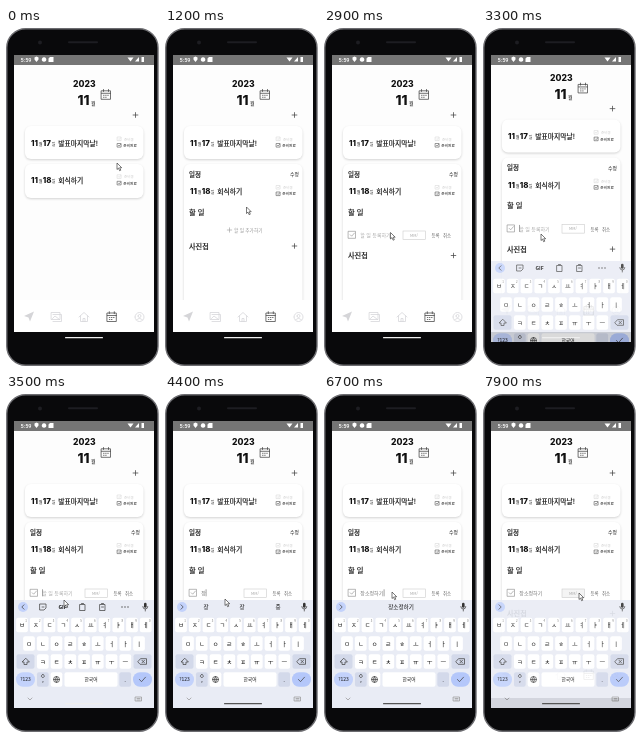
Animation of 153x338 px, one loop 8 s. Source, as an HTML page:

```html
<!DOCTYPE html>
<html lang="ko">
<head>
<meta charset="utf-8">
<style>
  html, body { margin: 0; width: 100%; height: 100%; overflow: hidden; background: #fff; }
  svg { display: block; width: 153px; height: 338px; }
  text { font-family: "Noto Sans CJK KR", "Noto Sans CJK", sans-serif; font-weight: 500; fill: #111; }
  .num { font-family: Inter, sans-serif; font-weight: 800; }
  .title { stroke: #111; stroke-width: .18; }
  .line { fill: none; stroke: #444; stroke-width: .75; stroke-linecap: round; stroke-linejoin: round; }
  .pale { stroke: #d5d5d8; }
  .card { fill: #fff; filter: drop-shadow(0 1.8px 1.2px rgba(0, 0, 0, .17)); }
</style>
</head>
<body>
<svg id="stage" viewBox="0 0 153 338"></svg>
<script>
const stage = document.getElementById('stage');
const text = (x, y, size, label, attrs = '') =>
  `<text x="${x}" y="${y}" font-size="${size}" ${attrs}>${label}</text>`;
const mid = (x, y, size, label, attrs = '') => text(x, y, size, label, 'text-anchor="middle" ' + attrs);
const title = (x, y, size, label) => text(x, y, size, label, 'class="title"');
const rect = (x, y, w, h, attrs = '') => `<rect x="${x}" y="${y}" width="${w}" height="${h}" ${attrs}/>`;
const line = (d, attrs = '', cls = '') => `<path class="line ${cls}" d="${d}" ${attrs}/>`;
const plus = (x, y, r, attrs = '') => line(`M${x - r} ${y}h${2 * r}M${x} ${y - r}v${2 * r}`, attrs);
const group = (id, body, attrs = '') => `<g id="${id}" ${attrs}>${body}</g>`;
const gray = 'style="fill:#999"';

const calendar = (x, y) =>
  line(`M${x - 4.5} ${y - 4}h9v8.5h-9zM${x - 4.5} ${y - 1.5}h9M${x - 2.5} ${y - 5.3}v2M${x + 2.5} ${y - 5.3}v2`) +
  line(`M${x - 2.5} ${y + .5}h5M${x - 2.5} ${y + 2.5}h3`, 'stroke-dasharray=".6 1.5"');

const check = (x, y, s, color) =>
  line(`M${x} ${y}h${s}v${s}h${-s}zM${x + s * .25} ${y + s * .5}l${s * .2} ${s * .2}l${s * .4} ${-s * .45}`,
    `style="stroke:${color};stroke-width:.6"`);

// One schedule entry, placed by its text baseline.
const entry = (y, day, name) =>
  text(25, y, 7.9, '11', 'class="num"') + text(32.8, y, 4, '월') +
  text(36.8, y, 7.9, day, 'class="num"') + text(45.8, y, 4, '일') +
  title(52.3, y, 6.8, name) +
  check(111.5, y - 8.5, 3.6, '#d8d8d8') + text(118, y - 5, 3.6, '준비중', 'style="fill:#d0d0d0"') +
  check(111.5, y - 2, 3.6, '#555') + text(117.3, y + 1.5, 3.7, '준비완료');

const header =
  mid(78.3, 59.3, 8.6, '2023', 'class="num"') +
  text(71.5, 77.3, 13.6, '11', 'class="num"') + text(85, 77, 5, '월') +
  calendar(100, 66.8) + plus(129.5, 87, 2.4);

const form =
  check(24.5, 203.3, 7, '#888') +
  text(36.3, 209, 5, '', 'id="typed"') +
  rect(36, 203.3, .6, 7, 'id="caret" fill="#666"') +
  rect(79, 203, 22.5, 8.5, 'id="dateBox" fill="#fff" stroke="#ccc" stroke-width=".6"') +
  mid(90, 208.8, 4, 'MM/', 'style="fill:#aaa"') +
  text(107.5, 209, 4.4, '등록', 'style="fill:#666"') + text(119, 209, 4.4, '취소', 'style="fill:#666"');

const tabs =
  rect(8, 272, 140, 40, 'fill="#fff"') +
  '<path d="M18 288l10-4.5-4 10-1.5-4z" fill="#d5d5d8"/>' +
  line('M45.5 284.5h8.5v7h-8.5zM47 286.5h8.5v7h-8.5M46.5 290.5l2.5-2.5 4.5 3.5', '', 'pale') +
  line('M73 289l5-4.5 5 4.5M74.5 288v5.5h7v-5.5M77 293.5v-3h2v3', '', 'pale') +
  calendar(105.8, 289) +
  line('M129 289a4.5 4.5 0 1 0 9 0a4.5 4.5 0 1 0-9 0M130.5 292a3.5 3.5 0 0 1 6 0M132 288a1.5 1.5 0 1 0 3 0a1.5 1.5 0 1 0-3 0', '', 'pale');

const key = (x, y, w, label = '', fill = '#fff', size = 6.2, r = 2) =>
  rect(x - w / 2, y - 7.3, w, 14.6, `rx="${r}" fill="${fill}"`) + mid(x, y + size * .36, size, label);
const keyRow = (letters, x, y) => [...letters].map((c, i) => key(x + i * 13.75, y, 11.7, c)).join('');

const keyboard =
  rect(8, 206, 140, 109, 'fill="#e9ecf5"') +
  '<circle cx="17" cy="213" r="5" fill="#c3d2fb"/>' +
  group('chevron', line('M16 210.8l2.2 2.2-2.2 2.2')) +
  group('tools',
    line('M34 210h6v4l-2 2h-4zM36 213h2M74 210.5h5v6h-5zM75.5 209.5h2M94 210.5h5v6h-5zM95.5 209.5h2M95.5 213h2') +
    mid(56.5, 215, 5, 'GIF', 'style="font-weight:800"') +
    [116, 119, 122].map(x => `<circle cx="${x}" cy="213" r=".7" fill="#444"/>`).join('')) +
  group('words', [41, 77, 113].map(x => mid(x, 215.2, 5.6, '')).join('')) +
  rect(138, 208.8, 2.6, 5, 'rx="1.3" fill="#333"') + line('M136.8 212.5a2.5 2.5 0 0 0 5 0M139.3 215v2') +
  keyRow('ㅂㅈㄷㄱㅅㅛㅕㅑㅐㅔ', 16, 231) +
  [...'1234567890'].map((c, i) => mid(20 + i * 13.75, 227.5, 2.8, c, 'style="fill:#666"')).join('') +
  keyRow('ㅁㄴㅇㄹㅎㅗㅓㅏㅣ', 23, 249.5) +
  key(19.5, 267.5, 18, '', '#d3d9ea') + line('M19.5 264.5l-3.5 3.5h2v2.5h3v-2.5h2z') +
  keyRow('ㅋㅌㅊㅍㅠㅜㅡ', 36.8, 267.5) +
  key(136.5, 267.5, 18, '', '#d3d9ea') + line('M132 267.5l2.5-2.8h6v5.6h-6zM136 266.3l2.5 2.5M138.5 266.3l-2.5 2.5') +
  key(19.5, 285.5, 19, '?123', '#c3d2fb', 5, 7) +
  key(36.8, 285.5, 11.7, ',', '#d3d9ea') + line('M36.8 280.5a1.5 1.5 0 1 0 .1 0') +
  key(50.5, 285.5, 11.7) + line('M47.5 285.5a3 3 0 1 0 6 0a3 3 0 1 0-6 0h6M50.5 282.5q-2.5 3 0 6q2.5-3 0-6') +
  key(85, 285.5, 53, '한국어', '#fff', 4.8) +
  key(119.2, 285.5, 11.7, '.', '#d3d9ea') +
  key(136.5, 285.5, 19, '', '#b4c7fa', 1, 7) + line('M133.5 285.5l2 2.2 4-4.5') +
  line('M22 304l2 2 2-2M129.5 303h6v4h-6zM131 304.5h3M131 306h3', 'style="stroke:#999"');

const phone =
  rect(.8, .8, 151.2, 336.4, 'rx="19" fill="#09090b" stroke="#6c6c70" stroke-width="1.4"') +
  '<circle cx="34" cy="14.5" r="2" fill="#1d1d22"/>' +
  rect(62, 13.3, 30, 2, 'rx="1" fill="#1d1d22"');

const statusBar =
  rect(8, 27, 140, 10, 'fill="#757575"') +
  text(14.5, 33.9, 5.6, '5:59', 'style="fill:#fff;font-family:Roboto,sans-serif"') +
  '<path d="M28.5 29.5l2-1 2 1v2l-2 2.5-2-2.500zM38 29.200a2.300 2.300 0 1 0 .1 0M44 29h3.500v5h-5v-3.500zM121.500 29.500h6l-3 4zM129 33.500l4-4.500v4.500zM135.500 29h2.500v5h-2.500z" fill="#fff"/>';

stage.innerHTML =
  '<clipPath id="screen"><rect x="8" y="27" width="140" height="287"/></clipPath>' +
  phone +
  group('view',
    rect(8, 27, 140, 278, 'fill="#fdfdfd"') +
    group('page',
      header +
      rect(19, 98, 118.5, 33, 'class="card" rx="6"') + entry(117.5, '17', '발표마지막날!') +
      rect(19, 136, 118.5, 34, 'id="card" class="card" rx="6"') +
      group('entry', entry(155.3, '18', '회식하기')) +
      group('details',
        title(24, 148.5, 6.5, '일정') + text(125, 148, 4.8, '수정') + title(24, 186.8, 7.3, '할 일') +
        group('add', plus(64.5, 202, 2.2, 'style="stroke:#999;stroke-width:.6"') + text(69, 203.8, 4.7, '할 일 추가하기', gray)) +
        group('form', form) +
        group('photos', title(24, 220.8, 7.2, '사진첩') + plus(129.5, 218, 2.3))) +
      tabs) +
    rect(8, 304, 140, 11, 'fill="#09090b"') +
    statusBar +
    group('keyboard', keyboard) +
    rect(59, 309, 38, 1.3, 'id="pill" rx=".6"'),
    'clip-path="url(#screen)"') +
  group('cursor', '<path d="M0 0v6.5l1.5-1.4 1.1 2.6 1.2-.5-1.1-2.5h2z" fill="#fff" stroke="#222" stroke-width=".6"/>');

const el = {};
stage.querySelectorAll('[id]').forEach(node => el[node.id] = node);
const words = el.words.querySelectorAll('text');

const ramp = (t, from, to) => Math.min(1, Math.max(0, (t - from) / (to - from)));
const easeOut = (p, power = 2) => 1 - (1 - p) ** power;
const show = (node, amount) => node.setAttribute('opacity', amount);
const shift = (node, y, x = 0) => node.setAttribute('transform', `translate(${x} ${y})`);

// time, x, y of the pointer tip
const path = [
  [0, 111, 135], [100, 111, 135], [300, 111.5, 136], [600, 111.5, 136], [1200, 81.5, 179],
  [1300, 82, 172], [1500, 83, 165], [1600, 83, 165], [2000, 75, 203], [2600, 75, 203],
  [3200, 58, 206], [4000, 58, 206], [4300, 60, 205], [6300, 60, 205], [6700, 68, 198],
  [6800, 68, 198], [7000, 82, 199], [7100, 82, 199], [7700, 96, 199], [8000, 96, 199]];

const typing = [
  [4200, 'ㅈ'], [4300, '자'], [4400, '장'], [4600, '장ㅅ'], [4800, '장소'], [5000, '장소ㅈ'],
  [5200, '장소저'], [5400, '장소정'], [5600, '장소정하'], [5700, '장소정하기']];

function pointer(t) {
  const i = path.findIndex(p => p[0] > t);
  const [a, b] = [path[i - 1], path[i]];
  const p = ramp(t, a[0], b[0]);
  shift(el.cursor, a[2] + (b[2] - a[2]) * p, a[1] + (b[1] - a[1]) * p);
}

function draw(t) {
  pointer(t);

  const open = easeOut(ramp(t, 400, 1000));
  el.card.setAttribute('height', 34 + 150 * open);
  shift(el.entry, 10.7 * open);
  show(el.details, ramp(t, 500, 1100));

  const formIn = ramp(t, 2300, 2800);
  show(el.add, t < 2300 ? 1 - .85 * ramp(t, 1900, 2200) : .15 * (1 - formIn));
  show(el.form, formIn);
  shift(el.photos, 9.5 * easeOut(formIn));

  const slide = ramp(t, 3100, 3500);
  const closing = t >= 7900;
  shift(el.page, -8 * easeOut(slide, 2.3));
  shift(el.keyboard, 108 * (1 - easeOut(slide)));
  show(el.keyboard, closing ? .9 : slide < 1 ? .85 : 1);
  el.pill.setAttribute('fill', t >= 3700 ? '#555' : '#eee');

  const last = typing.filter(([at]) => at <= t).pop();
  const value = last ? last[1] : '';
  el.typed.textContent = value || '할 일 등록하기';
  el.typed.style.fill = value ? '#777' : '#aaa';
  el.caret.setAttribute('x', 36 + value.length * 4.75);
  const since = t - (last ? last[0] : 3200);
  show(el.caret, !closing && t >= 3200 && since % 1000 < 500 ? 1 : 0);
  el.dateBox.setAttribute('fill', closing ? '#f4f4f4' : '#fff');

  show(el.tools, value ? 0 : 1);
  el.chevron.setAttribute('transform', value ? '' : 'rotate(180 17 213)');
  show(el.words, closing ? 0 : 1);
  const three = value && value.length < 3;
  words[0].textContent = three ? value : '';
  words[1].textContent = value;
  words[2].textContent = three ? (value.length > 1 ? '중소' : '중') : '';
}

function tick() {
  draw(Math.floor(performance.now() % 8000 / 100) * 100);
  requestAnimationFrame(tick);
}
tick();
</script>
</body>
</html>
```
